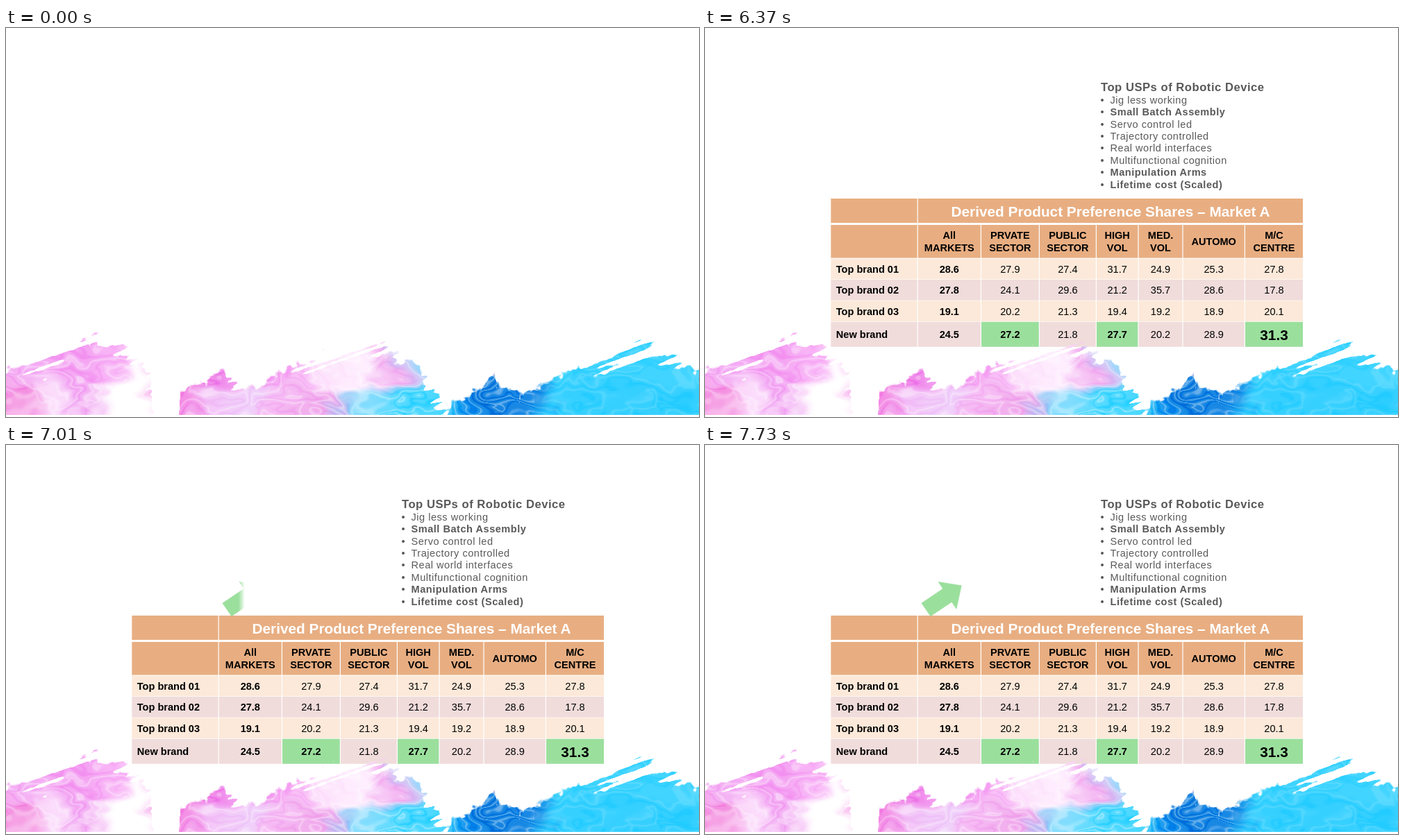
An HTML page with a canvas for the animation above (8000 ms loop, 998 by 561 pixels).

```html
<!DOCTYPE html>
<html lang="en">
<head>
<meta charset="utf-8">
<title>Preference shares</title>
<style>
html, body { margin: 0; width: 100%; height: 100%; overflow: hidden; background: #fff; }
svg, canvas, #arrow { position: absolute; left: 0; top: 0; }
canvas { top: 430px; }
text { font-family: "Liberation Sans", Arial, sans-serif; font-size: 14.55px; }
.b { font-weight: bold; }
.mid { text-anchor: middle; }
.big { font-size: 20.79px; }
#table { animation: table 8s step-end infinite; }
#usp { fill: #595959; letter-spacing: .52px; animation: usp 8s step-end infinite; }
#usp .head { font-size: 16.63px; }
#arrow {
  left: 311px; top: 196px; width: 60px; height: 53px; background: #9bdf9d;
  clip-path: polygon(.5px 32px, 31.2px 11.3px, 24.5px 1px, 58.7px 6.5px, 51.2px 41px, 44.3px 30.7px, 13.7px 51.3px);
  -webkit-mask: linear-gradient(90deg, #000 91px, transparent 100px) -200px 0 / 200px 100% no-repeat;
  mask: linear-gradient(90deg, #000 91px, transparent 100px) -200px 0 / 200px 100% no-repeat;
  animation: wipe 8s step-end infinite;
}
@keyframes table { 0% { opacity: 0 } 6.25%, 100% { opacity: 1 } }
@keyframes usp { 0% { opacity: 0 } 42.375%, 100% { opacity: 1 } }
@keyframes wipe {
  0% { -webkit-mask-position: -200px 0; mask-position: -200px 0; }
  79.625% { -webkit-mask-position: -97.5px 0; mask-position: -97.5px 0; animation-timing-function: steps(34); }
  96.625%, 100% { -webkit-mask-position: -33px 0; mask-position: -33px 0; }
}
</style>
</head>
<body>
<svg width="998" height="561" viewBox="0 0 998 561"><g id="table"></g><g id="usp"></g></svg>
<canvas id="paint" width="998" height="128"></canvas>
<div id="arrow"></div>
<script>
// ---- table and list ----
const edges = [181, 306.2, 397.4, 481.4, 563.4, 624, 688, 777.4, 861.6];
const mid = i => (edges[i] + edges[i + 1]) / 2;
const rect = (x1, y1, x2, y2, fill) =>
  `<rect x="${x1}" y="${y1}" width="${x2 - x1}" height="${y2 - y1}" fill="${fill}"/>`;
const text = (x, y, s, cls = '', fill = 'inherit') =>
  `<text x="${x}" y="${y}" class="${cls}" style="fill:${fill}">${s}</text>`;
const tan = '#e8ae82', green = '#9bdf9d';

const cells = (y1, y2, fillOf) => edges.slice(0, 8).map((x, i) =>
  rect(x + (i ? .6 : .3), y1, edges[i + 1] - .6, y2, fillOf(i))).join('');

let out = rect(181.3, 246, 305.6, 281, tan) + rect(306.8, 246, 861, 281, tan) +
  text(584, 271.8, 'Derived Product Preference Shares – Market A', 'b mid big', '#fff') +
  cells(284, 331.6, () => tan);
['All MARKETS', 'PRVATE SECTOR', 'PUBLIC SECTOR', 'HIGH VOL', 'MED. VOL', 'AUTOMO', 'M/C CENTRE'].forEach((s, i) => {
  const words = s.split(' ');
  words.forEach((w, k) => out += text(mid(i + 1), 313 + (k - (words.length - 1) / 2) * 17.5, w, 'b mid'));
});
[
  ['Top brand 01', '28.6 27.9 27.4 31.7 24.9 25.3 27.8'],
  ['Top brand 02', '27.8 24.1 29.6 21.2 35.7 28.6 17.8'],
  ['Top brand 03', '19.1 20.2 21.3 19.4 19.2 18.9 20.1'],
  ['New brand', '24.5 27.2 21.8 27.7 20.2 28.9 31.3']
].forEach(([name, values], r) => {
  const last = r === 3, y = 332.6 + r * 30.4, h = last ? 36 : 29.8;
  const base = y + h / 2 + 5.3;
  const hot = i => last && [2, 4, 7].includes(i);
  out += cells(y, y + h, i => hot(i) ? green : r % 2 ? '#f0dcdb' : '#fce9d9') + text(188.8, base, name, 'b');
  values.split(' ').forEach((v, i) => {
    const big = last && i === 6;
    out += text(mid(i + 1), base + (big ? 2.4 : 0), v, 'mid' + (i === 0 || hot(i + 1) ? ' b' : '') + (big ? ' big' : ''));
  });
});
document.getElementById('table').innerHTML = out;

const points = ['Jig less working', '*Small Batch Assembly', 'Servo control led', 'Trajectory controlled',
  'Real world interfaces', 'Multifunctional cognition', '*Manipulation Arms', '*Lifetime cost (Scaled)'];
document.getElementById('usp').innerHTML =
  text(570, 90.5, 'Top USPs of Robotic Device', 'b head') +
  points.map((s, i) => {
    const y = 108.6 + i * 17.46;
    return text(569.5, y, '•') + text(583.5, y, s.replace('*', ''), s[0] === '*' ? 'b' : '');
  }).join('');

// ---- marbled paint ----
const W = 998, H = 128, TOP = 430;
const clamp = v => Math.min(1, Math.max(0, v));
const ease = t => t * t * (3 - 2 * t);
const mix = (a, b, t) => a + (b - a) * t;

function hash(x, y) {
  let h = Math.imul(x, 374761393) + Math.imul(y, 668265263);
  h = Math.imul(h ^ (h >>> 13), 1274126177);
  return ((h ^ (h >>> 16)) >>> 0) / 4294967296;
}
function noise(x, y) {
  const i = Math.floor(x), j = Math.floor(y), u = ease(x - i), v = ease(y - j);
  return mix(mix(hash(i, j), hash(i + 1, j), u), mix(hash(i, j + 1), hash(i + 1, j + 1), u), v);
}
const fbm = (x, y) => noise(x, y) * .6 + noise(x * 2 + 31, y * 2 + 17) * .28 + noise(x * 4 + 7, y * 4 + 53) * .12;

// Upper edge of the brush marks
const crest = [[0, 492], [18, 476], [130, 434], [165, 442], [207, 482], [214, 570], [248, 570], [251, 520],
  [290, 506], [312, 490], [342, 515], [372, 512], [412, 482], [470, 456], [525, 440], [552, 446], [599, 486],
  [640, 540], [680, 520], [700, 498], [745, 527], [800, 498], [850, 468], [915, 444], [948, 454], [998, 488]];
function ridge(x) {
  const i = Math.max(1, crest.findIndex(p => p[0] >= x));
  const [x1, y1] = crest[i - 1], [x2, y2] = crest[i];
  return mix(y1, y2, (x - x1) / (x2 - x1));
}

// Colours every 50 px, above and below the main swirl
const ramp = s => s.split(' ').map(c => [0, 2, 4].map(i => parseInt(c.slice(i, i + 2), 16)));
const upper = ramp('f6b4f4 f4aef4 f5a6f3 f8b4f6 fffbff f48ce6 f08cec f4a4f2 f6aef4 fde4fc feeefe f4b8f2 a8dcfc 30b4f4 f0b8ea 28b0ee 40d4ff');
const lower = ramp('f490e0 fbdcfb f3b0f4 ffffff ffffff f490e6 f4c8f8 f0d0fa f6bcf4 f2b0ee 84dcfd 60dcff 4cd8ff 1c98ee 1884e0 1888e4 36d0ff');

function colour(x, y) {
  const a = fbm(x / 70, y / 44) - .5, b = fbm(x / 64 + 90, y / 46 + 40) - .5;
  const wx = x + 60 * a + 10 * Math.sin(b * 14), wy = y + 50 * b + 6 * Math.sin(a * 14);
  const pos = Math.min(15.999, Math.max(0, wx / 50)), i = Math.floor(pos), t = ease(pos - i);
  const down = ease(clamp((wy - 503) / 18));
  const wave = Math.sin(fbm(wx / 60 + 11, wy / 38) * 30);
  const depth = 1 + (x > 760 ? .4 : 1) * (wave > 0 ? -.35 : .25) * wave ** 4;
  return [0, 1, 2].map(c => {
    const base = mix(mix(upper[i][c], upper[i + 1][c], t), mix(lower[i][c], lower[i + 1][c], t), down);
    return 255 - (255 - base) * depth;
  });
}

// High or falling parts are dry and break up into slanted bristle marks
function cover(x, y, top, slope) {
  const dry = clamp(Math.max((488 - top) / 25, slope - .3));
  const bristle = noise((x - .36 * y) / 60, (y + .36 * x) / 4.5);
  const ragged = (fbm(x / 8, y / 8) - .5) * 18;
  return clamp((y - top + ragged - dry * 42 * bristle) / 4);
}

const ctx = document.getElementById('paint').getContext('2d');
const img = ctx.createImageData(W, H);
for (let x = 0; x < W; x++) {
  const top = ridge(x), slope = (ridge(Math.min(x + 6, W)) - ridge(Math.max(x - 6, 0))) / 12;
  for (let y = 0; y < H; y++) {
    const alpha = cover(x, y + TOP, top, slope);
    if (alpha) img.data.set([...colour(x, y + TOP), alpha * 255], (y * W + x) * 4);
  }
}
ctx.putImageData(img, 0, 0);
</script>
</body>
</html>
```
